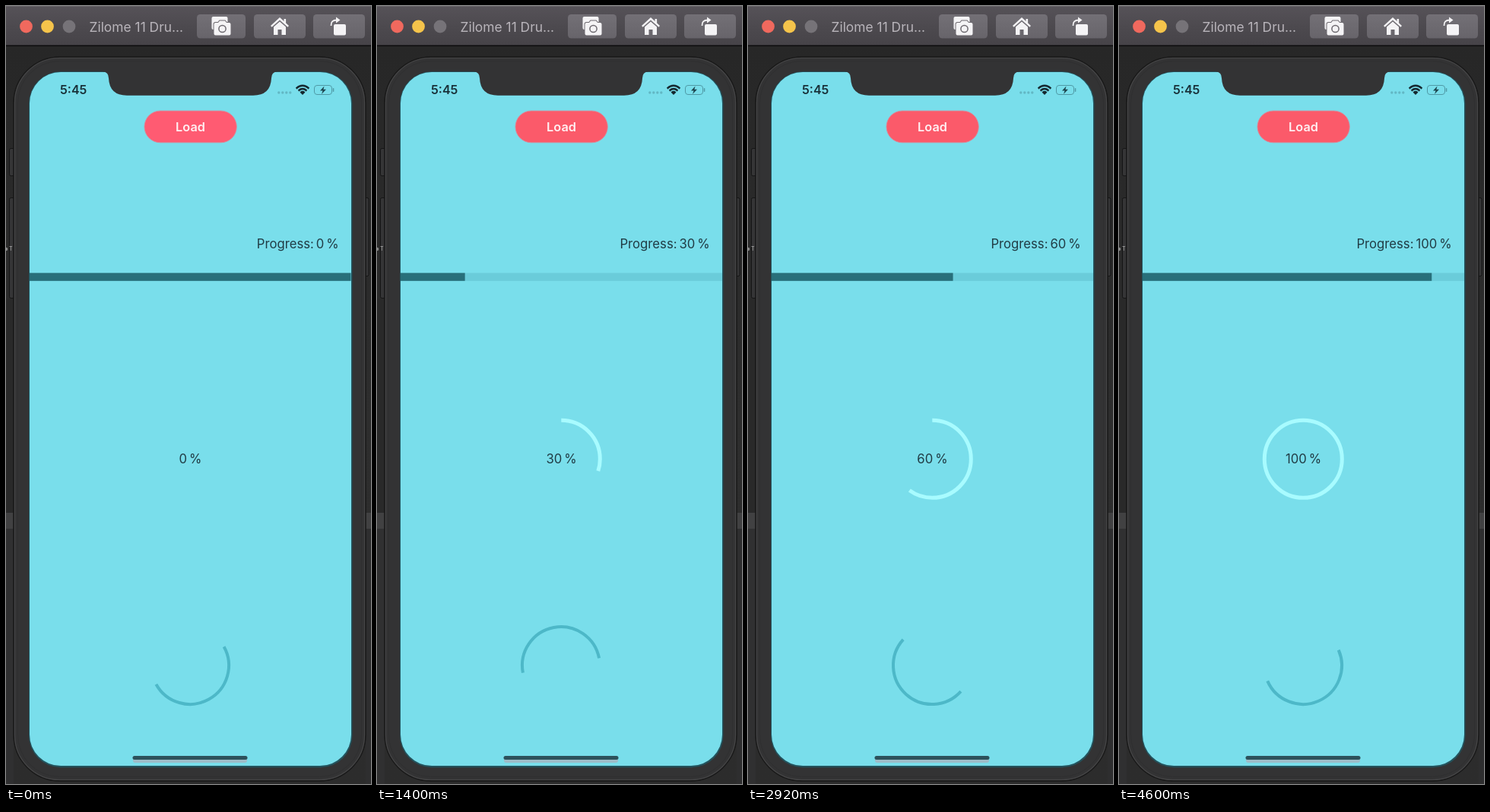
These frames come from a looping animation (480 by 1024 pixels, 4.64 s). An HTML page with a canvas:

```html
<!DOCTYPE html>
<html lang="en">
<head>
<meta charset="utf-8">
<title>Progress demo</title>
<style>
  html, body { margin: 0; width: 100%; height: 100%; overflow: hidden; background: #2b2b2b; }
  canvas { display: block; width: 480px; height: 1024px; }
</style>
</head>
<body>
<canvas id="stage" width="480" height="1024"></canvas>
<script>
const ctx = document.getElementById('stage').getContext('2d');
const LOOP = 4640, TICK = 40;
const STEP = 464, LABEL_LEAD = 40, BAR_TIME = 227;
const SCREEN = { x: 31, y: 87, w: 423, h: 913, r: 41 };
const BAR_W = 422.5;
const AQUA = '#79deeb', INK = '#203b44', BEZEL = '#333334', ICON = '#f4f3f5';

// Spinner heading in degrees at a few times, straight between them.
const SPIN = [[0, -29], [40, -2.4], [400, 138], [880, 325], [1960, 749],
  [2920, 1122], [3560, 1374.5], [4600, 1776.4]];

const rad = deg => deg * Math.PI / 180;
const clamp = v => Math.max(0, Math.min(1, v));
const ease = v => v * v * (3 - 2 * v);

function spinAt(t) {
  let i = 1;
  while (i < SPIN.length - 1 && t > SPIN[i][0]) i++;
  const [t0, a0] = SPIN[i - 1], [t1, a1] = SPIN[i];
  return a0 + (a1 - a0) * (t - t0) / (t1 - t0);
}

function percentAt(t) {
  return 10 * Math.min(10, Math.floor((t + LABEL_LEAD) / STEP));
}

function barAt(t) {
  const n = Math.floor(t / STEP);
  const from = n ? (n - 1) / 10 : 1;
  return from + (n / 10 - from) * ease(clamp((t - n * STEP) / BAR_TIME));
}

function rect(x, y, w, h, fill) {
  ctx.fillStyle = fill;
  ctx.fillRect(x, y, w, h);
}

function round(x, y, w, h, r, fill, stroke, line = 1) {
  ctx.beginPath();
  ctx.roundRect(x, y, w, h, r);
  if (fill) { ctx.fillStyle = fill; ctx.fill(); }
  if (stroke) { ctx.strokeStyle = stroke; ctx.lineWidth = line; ctx.stroke(); }
}

function disc(x, y, r, fill) {
  ctx.beginPath();
  ctx.arc(x, y, r, 0, 7);
  ctx.fillStyle = fill;
  ctx.fill();
}

function arc(x, y, r, start, sweep, width, color) {
  ctx.beginPath();
  ctx.arc(x, y, r, rad(start), rad(start + sweep));
  ctx.strokeStyle = color;
  ctx.lineWidth = width;
  ctx.stroke();
}

function shape(d, fill) {
  ctx.fillStyle = fill;
  ctx.fill(new Path2D(d));
}

function text(str, x, y, size, color, align = 'left', weight = 400) {
  ctx.font = `${weight} ${size}px Inter, Roboto, sans-serif`;
  ctx.textAlign = align;
  ctx.textBaseline = 'alphabetic';
  ctx.fillStyle = color;
  ctx.fillText(str, x, y);
}

function fade(y0, y1, ...colors) {
  const g = ctx.createLinearGradient(0, y0, 0, y1);
  colors.forEach((c, i) => g.addColorStop(i / (colors.length - 1), c));
  return g;
}

function drawDesktop() {
  rect(0, 0, 480, 1024, fade(52, 1024, '#272727', '#2d2d2d', '#2c2c2c'));
  rect(0, 385, 10, 282, '#292929');
  rect(0, 688, 10, 336, '#303031');
  rect(473, 688, 7, 336, '#2e2e2f');
  rect(0, 667, 480, 21, '#414142');
}

function drawCamera() {
  round(270.5, 14, 21, 17, 2, ICON);
  const body = new Path2D('M275.5 22H279l2-2.5h7l2 2.5h3.5q2 0 2 2v12.5q0 2-2 2h-18q-2 0-2-2V24q0-2 2-2z');
  ctx.strokeStyle = '#6d696f';
  ctx.lineWidth = 2;
  ctx.stroke(body);
  ctx.fillStyle = ICON;
  ctx.fill(body);
  arc(284.5, 30, 4.6, 0, 360, 1.5, '#6d696f');
}

function drawHome() {
  shape('M360 15l12 11-1.6 1.8L360 18.6l-10.4 9.2L348 26z', ICON);
  shape('M360 20.5l8 7V38h-5.5v-7h-5v7H352v-10.5z', ICON);
  rect(365.5, 17, 2.6, 6, ICON);
}

function drawRotate() {
  round(431, 24, 16, 14.5, 2, ICON);
  ctx.beginPath();
  ctx.moveTo(427.5, 26);
  ctx.quadraticCurveTo(427, 18.5, 435, 18.5);
  ctx.strokeStyle = ICON;
  ctx.lineWidth = 1.8;
  ctx.stroke();
  shape('M434 14.5l5.5 4-5.5 4z', ICON);
}

function drawTitleBar() {
  rect(0, 0, 480, 52, fade(0, 52, '#565258', '#4d4a4f', '#464348'));
  rect(0, 0, 480, 1, '#686469');
  rect(0, 51.5, 480, 1.5, '#0c0c0c');
  [[26.5, '#f0695e'], [54.5, '#f5c44b'], [83, '#767378']].forEach(([x, c]) => disc(x, 27, 8.4, c));
  text('Zilome 11 Dru...', 109.5, 33.5, 17.4, '#b9b5bb');
  [[251, 64], [326, 68], [404, 68]].forEach(([x, w]) => {
    round(x, 11, w, 31.5, 4.5, fade(11, 43, '#737076', '#67646a'));
  });
  drawCamera();
  drawHome();
  drawRotate();
}

function sideKey(x, y, w, h) {
  round(x, y, w, h, 2, '#353536', '#141414');
}

function drawPhone() {
  sideKey(4.5, 187.5, 8, 36);
  sideKey(4.5, 252.5, 8, 132);
  sideKey(470, 252.5, 7, 103);
  disc(0, 320, 2.3, '#8b8b8b');
  text('T', 4, 322, 7, '#bdbdbd');
  round(10, 67, 463, 953, 61, BEZEL, '#191919', 1.5);
  round(11.5, 68.5, 460, 950, 59, null, '#454546', 1.2);
  round(15.5, 72.5, 452, 942, 55, null, '#2f2f30', 1);
  const { x, y, w, h, r } = SCREEN;
  round(x - 1, y - .7, w + 2.5, h + 3, r + 1, '#23525c');
  round(x, y, w, h, r, AQUA);
  shape('M127 86Q135 87 135 95Q136 117.7 159 117.7H325Q348 117.7 349 95Q349 87 357 86Z', BEZEL);
}

function drawStatus() {
  text('5:45', 71, 116, 16, '#183038', 'left', 600);
  for (let i = 0; i < 4; i++) disc(358.8 + i * 5, 114, 1.7, '#62b7c4');

  // Wi-Fi fan
  ctx.save();
  ctx.beginPath();
  ctx.moveTo(390, 117);
  ctx.lineTo(379, 106);
  ctx.lineTo(379, 98);
  ctx.lineTo(401, 98);
  ctx.lineTo(401, 106);
  ctx.clip();
  [10.7, 6.6].forEach(r => arc(390, 115.5, r, 180, 180, 2.5, '#15282f'));
  disc(390, 115.5, 3.7, '#15282f');
  ctx.restore();

  round(405.5, 104.5, 23, 12, 3.5, null, '#4f9aa6');
  round(429.8, 108, 1.5, 5, 1, '#4f9aa6');
  shape('M418.5 105.5l-5.5 6h3.5l-1.5 4.5 6-6.3h-3.6z', '#1d444d');
}

function drawApp(t) {
  const pct = percentAt(t);
  round(182, 138, 121.3, 41.8, 20.9, t < 80 ? '#ff5b72' : '#fb5a6a', '#d48d9c', .9);
  text('Load', 242.5, 165, 16.3, '#fff0f2', 'center', 600);

  rect(SCREEN.x, 351.4, SCREEN.w, 10.4, '#6accda');
  rect(SCREEN.x, 351.4, BAR_W * barAt(t), 10.4, '#286f7a');

  if (pct) arc(242.3, 596.3, 51, -90, pct * 3.6, 5, '#a8fbff');

  ctx.wordSpacing = '-1.7px';
  text(`Progress: ${pct} %`, 437.7, 318.7, 16.7, INK, 'right');
  text(`${pct} %`, 242.5, 602.3, 16.7, INK, 'center');
  ctx.wordSpacing = '0px';

  arc(242, 868, 51, spinAt(t), 180, 4, '#4db8c8');

  round(167, 990, 150, 6, 3, '#9dbcc8');
  round(166.5, 987, 151, 5, 2.5, '#2c515b');
}

function frame(now) {
  const t = Math.floor((now % LOOP) / TICK) * TICK;
  drawDesktop();
  drawTitleBar();
  drawPhone();
  drawStatus();
  drawApp(t);
  requestAnimationFrame(frame);
}
frame(0);
</script>
</body>
</html>
```
